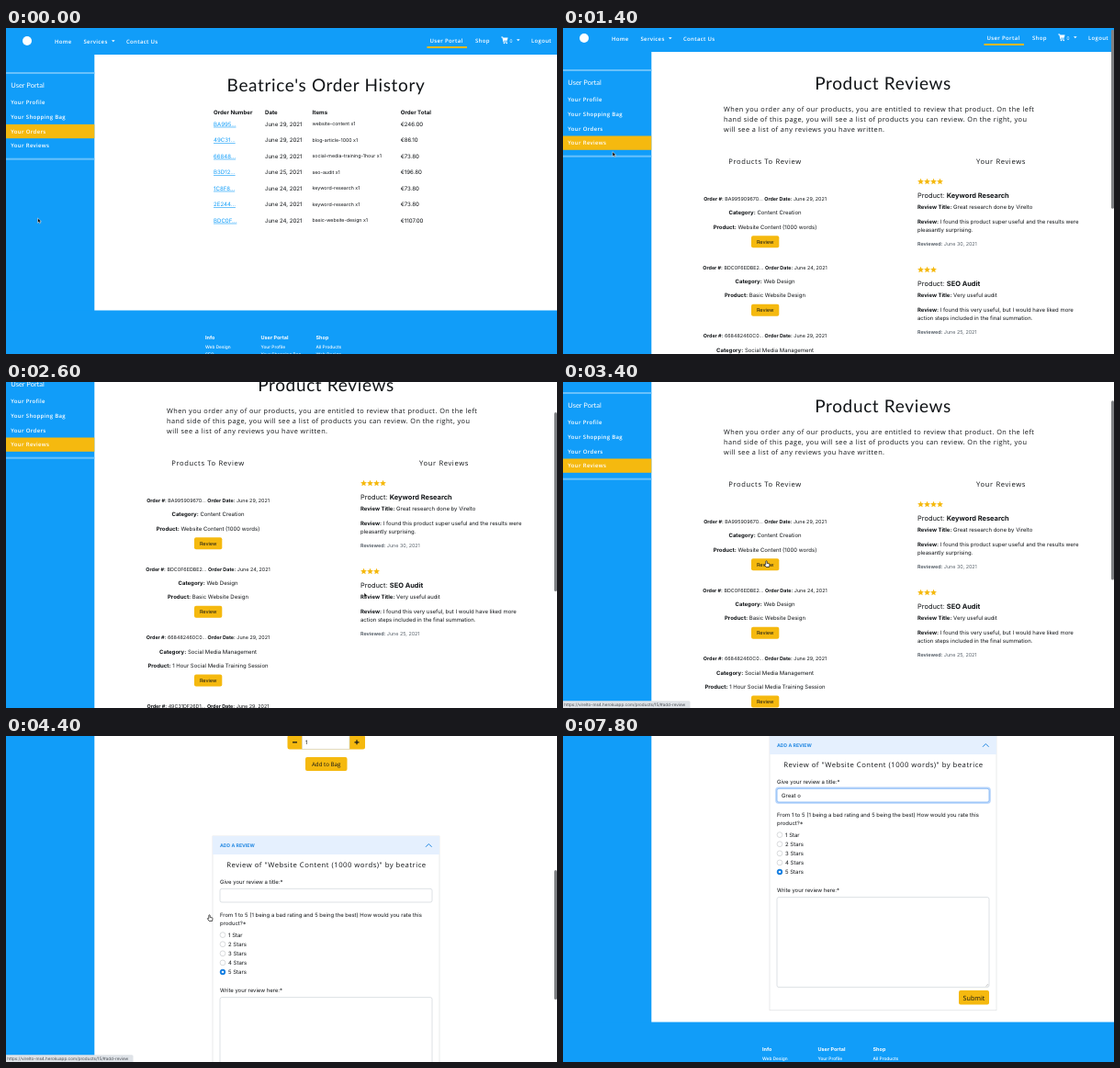
Recreate the animation shown at these times as an HTML page. Size 600 px wide and 355 px high, loop 8 s.

```html
<!DOCTYPE html>
<html lang="en">
<head>
<meta charset="utf-8">
<title>Order history and reviews</title>
<style>
  html, body { margin: 0; width: 100%; height: 100%; overflow: hidden; background: #fff; }
  svg { display: block; width: 600px; height: 355px; }
  text { font-family: Inter, sans-serif; fill: #111417; white-space: pre; text-rendering: geometricPrecision; }
  text.open { font-family: "Open Sans", sans-serif; font-weight: 500; }
  text.title { font-family: Lato, sans-serif; letter-spacing: .65px; text-anchor: middle; }
  text.prose { letter-spacing: .45px; }
  text.menu { font-weight: 600; letter-spacing: .32px; }
  text.side { font-family: Lato, sans-serif; }
  text.mid { text-anchor: middle; }
  text.bold { font-weight: 700; }
  text.white { fill: #fff; }
  text.link { fill: #119df9; }
  text.muted { fill: #59626b; }
</style>
</head>
<body>
<svg viewBox="0 0 600 355" id="stage"></svg>
<script>
const BLUE = '#119df9', YELLOW = '#f5b90f', PALE = '#68c1fb';
const LOOP = 8000, VIEW = 355, SIDE = 96.3;
const SITE = 'https://virelto-ms4.herokuapp.com/';

// ---------- drawing helpers ----------
// y is the middle of the capitals
const text = (x, y, str, size, cls = '', extra = '') =>
  `<text x="${x}" y="${(y + size * .36).toFixed(2)}" font-size="${size}" class="${cls}" ${extra}>` +
  str.replace(/<b>(.*?)<\/b>/g, '<tspan font-weight="700">$1</tspan>') + '</text>';
const rect = (x, y, w, h, fill, r = 0, extra = '') =>
  `<rect x="${x}" y="${y}" width="${w}" height="${h}" rx="${r}" fill="${fill}" ${extra}/>`;
const circle = (x, y, r, fill, extra = '') =>
  `<circle cx="${x}" cy="${y}" r="${r}" fill="${fill}" ${extra}/>`;
const line = (d, stroke, width = 1, extra = '') =>
  `<path d="${d}" fill="none" stroke="${stroke}" stroke-width="${width}" ${extra}/>`;
const shift = (dy, body) => `<g transform="translate(0 ${dy})">${body}</g>`;
const each = (list, fn) => list.map(fn).join('');
const open = (x, y, str, size, cls = '', extra = '') => text(x, y, str, size, 'open ' + cls, extra);
const title = (y, str) => text(348.5, y, str, 19, 'title');
const prose = (x, y, lines) => each(lines, (s, i) => open(x, y + i * 11, s, 7.33, 'prose'));

function star(cx, cy) {
  const points = Array.from({ length: 10 }, (_, i) => {
    const r = i % 2 ? 1.7 : 3.6, a = i * Math.PI / 5;
    return `${(cx + r * Math.sin(a)).toFixed(2)},${(cy - r * Math.cos(a)).toFixed(2)}`;
  });
  return `<polygon points="${points.join(' ')}" fill="${YELLOW}"/>`;
}

// ---------- shared page parts ----------
const caret = (x) => `<path d="M${x} 13.2h3.6l-1.8 2z" fill="#fff"/>`;

function nav(active) {
  const item = (x, s) => open(x, 14.5, s, 6, 'menu white');
  const underline = active === 'Shop' ? rect(508, 20, 22, 2, YELLOW) : rect(458.5, 20, 43.5, 2, YELLOW);
  return rect(0, 0, 600, 29, BLUE) + circle(23, 14, 5, '#fff') +
    item(53, 'Home') + item(84.5, 'Services') + caret(115) + item(131, 'Contact Us') +
    `<g transform="translate(0 -1)">${item(461.5, 'User Portal') + item(511, 'Shop') + item(572, 'Logout')}` +
    caret(556) + open(548.5, 14.8, '0', 5.2, 'white') +
    '<path d="M539.3 10.6h1.8l.3 1h5.2l-.9 3.2h-3.7l.2.8h3.5v.9h-4.2l-1.1-5h-1.1z" fill="#fff"/>' +
    circle(542.5, 17.5, .8, '#fff') + circle(545.2, 17.5, .8, '#fff') + '</g>' + underline;
}

function sidebar(heading, items, active) {
  let y = 81.3, rows = '';
  for (const lines of items) {
    if (lines[0] === active) rows += rect(0, y - 7.6, SIDE, 15.3, YELLOW);
    rows += each(lines, (s, i) => open(5.3, y + i * 9.4, s, 6, 'menu white'));
    y += 15.6 + (lines.length - 1) * 9.4;
  }
  return rect(0, 0, SIDE, 1000, BLUE) + rect(0, 48, SIDE, 2, PALE) + rect(0, y - 2, SIDE, 2, PALE) +
    text(5.3, 62, heading, 7.5, 'side white') + rows;
}

function footer(y) {
  const columns = [
    [217, 'Info', 'Web Design', 'SEO', 'Social Media', 'Content Creation'],
    [277.5, 'User Portal', 'Your Profile', 'Your Shopping Bag', 'Your Orders', 'Your Reviews'],
    [337.5, 'Shop', 'All Products', 'Web Design', 'SEO', 'Social Media']
  ];
  return rect(0, y, 600, 400, BLUE) + each(columns, ([x, head, ...links]) =>
    text(x, y + 30, head, 5.5, 'bold white') +
    each(links, (s, i) => text(x, y + 40 + i * 7.6, s, 4.8, 'white', 'font-weight="500"')));
}

const portalItems = ['Your Profile', 'Your Shopping Bag', 'Your Orders', 'Your Reviews'].map(s => [s]);

// ---------- order history ----------
function ordersPage() {
  const rows = [
    ['BA995', 'June 29', 'website-content', '246.00'],
    ['49C31', 'June 29', 'blog-article-1000', '86.10'],
    ['66848', 'June 29', 'social-media-training-1hour', '73.80'],
    ['B3D12', 'June 25', 'seo-audit', '196.80'],
    ['1C8F8', 'June 24', 'keyword-research', '73.80'],
    ['2E244', 'June 24', 'keyword-research', '73.80'],
    ['BDC0F', 'June 24', 'basic-website-design', '1107.00']
  ];
  const cols = [226, 282, 333.5, 429.7];
  return sidebar('User Portal', portalItems, 'Your Orders') + nav('User Portal') + footer(307.5) +
    title(62.5, "Beatrice's Order History") +
    each(['Order Number', 'Date', 'Items', 'Order Total'], (s, i) => text(cols[i], 92, s, 6.1, 'bold')) +
    each(rows, ([id, day, item, price], i) => {
      const y = 104.5 + i * 17.5;
      return text(cols[0], y, id + '...', 6.1, 'link', 'text-decoration="underline"') +
        text(cols[1], y, day + ', 2021', 6.1) + text(cols[2], y - .3, item + ' x1', 5.25) +
        text(cols[3], y, '€' + price, 6.1);
    }) +
    `<g id="hover">${rect(.5, 120.2, 96, 15.8, BLUE, 0, 'stroke="#0b1a28" stroke-width="1.1"')}` +
    rect(1, 133.6, 95, 1.8, YELLOW) + open(5.3, 128.1, 'Your Reviews', 6, 'menu white') + '</g>';
}

// ---------- reviews ----------
function reviewsPage() {
  const cards = [
    ['BA995909670', 29, 'Content Creation', 'Website Content (1000 words)'],
    ['BDC0F6EDBE2', 24, 'Web Design', 'Basic Website Design'],
    ['668482460C0', 29, 'Social Media Management', '1 Hour Social Media Training Session'],
    ['49C31DF26D1', 29, 'Content Creation', 'Blog Article (1000 words)']
  ];
  const reviews = [
    [4, 'Keyword Research', 'Great research done by Virelto',
      'I found this product super useful and the results were', 'pleasantly surprising.', 30],
    [3, 'SEO Audit', 'Very useful audit',
      'I found this very useful, but I would have liked more', 'action steps included in the final summation.', 25]
  ];
  return sidebar('User Portal', portalItems, 'Your Reviews') + nav('User Portal') + footer(541) +
    title(63, 'Product Reviews') +
    prose(175, 91.5, [
      'When you order any of our products, you are entitled to review that product. On the left',
      'hand side of this page, you will see a list of products you can review. On the right, you',
      'will see a list of any reviews you have written.']) +
    open(220, 148.5, 'Products To Review', 7.6, 'mid', 'letter-spacing=".63"') +
    open(477, 148.5, 'Your Reviews', 7.6, 'mid', 'letter-spacing=".63"') +
    each(cards, ([id, day, category, product], i) => shift(189 + i * 74.6,
      text(220, 0, `<b>Order #:</b> ${id}... <b>Order Date:</b> June ${day}, 2021`, 5.4, 'mid') +
      text(220, 15.2, `<b>Category:</b> ${category}`, 6, 'mid') +
      text(220, 30.6, `<b>Product:</b> ${product}`, 6, 'mid') +
      rect(205, 40.2, 30.3, 13, YELLOW, 2) + text(220.2, 46.6, 'Review', 5.5, 'mid'))) +
    each(reviews, ([stars, product, head, first, second, day], i) => shift(170 + i * 96,
      each([...Array(stars).keys()], n => star(389.5 + n * 7, .3)) +
      text(386, 15.5, `Product: <b>${product}</b>`, 7.45) +
      text(386, 28, `<b>Review Title:</b> ${head}`, 5.97) +
      text(386, 43.4, `<b>Review:</b> ${first}`, 5.97) + text(386, 52.6, second, 5.97) +
      text(386, 68.5, `<b>Reviewed:</b> June ${day}, 2021`, 5.4, 'muted')));
}

// ---------- product ----------
function illustration() {
  const browser = rect(319, 76, 106, 73.5, '#ebebeb') + rect(319, 76, 106, 6.5, '#dfdfdf') +
    each([322, 325.3, 328.6], x => circle(x, 79.3, 1, '#f7f7f7')) +
    rect(343, 91.5, 58, 4.5, 'none', 2, 'stroke="#d2d2d2" stroke-width=".7"') +
    rect(330, 109, 24, 22, '#e5e5e5', 0, 'stroke="#d8d8d8" stroke-width=".6"') +
    each([109.5, 117.7, 126], y => rect(359, y, 58, 5, '#fff', 1));
  const card = rect(294.3, 115, 52.5, 65, '#fff', 4, 'stroke="#777" stroke-width=".9"') +
    rect(304, 125, 33, 21, BLUE, 2) +
    each([151, 159, 167], y => rect(304, y, 33, 4.6, '#c6c6c6', 2.3)) +
    circle(345, 116, 4.8, BLUE) + line('M343 116h4M345 114v4', '#17344c', .8);
  const person =
    '<path d="M274 148h13l-.5 29h-3.6l-2-20-2.8 20.5h-3.6z" fill="#23232b"/>' +
    '<path d="M274 180v-2l3.3-.5 2.2 2.5zM282.5 180v-2.5h3.5l3.5 2.5z" fill="#23232b"/>' +
    line('M284 138l8 .2 4-1.2', '#eea886', 2.2) + line('M289 128l6.5-9.5', '#eea886', 2) +
    '<path d="M275 125q5-2 8 0l6 3 1.6 3-4 1.5 1 16h-13.4l-.8-15q-.5-6 1.6-8.5z" fill="#119df9"/>' +
    line('M277 131l2 6.5 6 1', '#0d7fd0', 2.6) +
    rect(277, 120, 4, 5.5, '#eea886') + circle(278.5, 118, 3.9, '#eea886') +
    '<path d="M273.5 119q-2-5.5 4-6 5-.4 6 2.5-3 .9-5.5.8-.5 3-2 4.2z" fill="#23232b"/>';
  return browser + card + person;
}

function reviewForm() {
  const label = (y, s) => text(233, y, s, 5.95);
  return rect(225, 0, 247, 298.7, '#fff', 0, 'stroke="#dfe1e3" stroke-width=".7"') +
    rect(225, 0, 247, 20, '#e5f0fe') + text(233, 10.2, 'ADD A REVIEW', 5.15, 'bold', 'style="fill:#2187e2"') +
    line('M457 11.8l3.3-3.3 3.3 3.3', '#2187e2', 1) +
    open(349, 31, 'Review of "Website Content (1000 words)" by beatrice', 7.7, 'mid', 'letter-spacing=".5"') +
    label(49.5, 'Give your review a title:*') +
    rect(233, 57.3, 231, 14.7, '#fff', 2, 'stroke="#ced4da" stroke-width=".7"') +
    `<g id="focus">${rect(232.2, 56.5, 232.6, 16.3, 'none', 2.5, 'stroke="#b9d6fb" stroke-width="2"')}` +
    rect(233, 57.3, 231, 14.7, '#fff', 2, 'stroke="#7db3f5" stroke-width=".8"') + '</g>' +
    text(238, 64.6, '', 6, '', 'id="typed"') + rect(238, 61, .7, 7.2, '#222', 0, 'id="caret"') +
    label(86, 'From 1 to 5 (1 being a bad rating and 5 being the best) How would you rate this') +
    label(95.3, 'product?*') +
    each([1, 2, 3, 4, 5], n => {
      const y = 97.5 + n * 10.1, on = n === 5;
      return circle(236, y, 2.9, on ? '#0d7ae0' : '#fff', `stroke="${on ? '#0d7ae0' : '#bfc3c7'}" stroke-width=".6"`) +
        (on ? circle(236, y, 1.3, '#fff') : '') + text(242, y, `${n} Star${n > 1 ? 's' : ''}`, 6);
    }) +
    label(167.5, 'Write your review here:*') +
    rect(233, 175.6, 231, 98, '#fff', 2, 'stroke="#ced4da" stroke-width=".7"') +
    line('M460.5 272.6l2.6-2.6M462 272.6l1.1-1.1', '#999', .5) +
    rect(431, 277, 33, 15.4, YELLOW, 2) + open(447.5, 285, 'Submit', 7.2, 'mid');
}

const FORM_TOP = 477;

function productPage() {
  const menu = [['Shop All Products'], ['Shop Web Design'], ['Shop SEO'],
    ['Shop Social Media', 'Management'], ['Shop Content Creation']];
  return sidebar('Shop', menu) + nav('Shop') + footer(788.5) +
    line('M115 47h-5.3m2.5-2.6l-2.6 2.6 2.6 2.6', '#1187e0', 1) +
    text(117, 47, 'Back to Reviews', 6.5, '', 'style="fill:#1187e0"') +
    title(87.5, 'Website Content (1000 words)') + shift(39, illustration()) +
    prose(172, 237.5, [
      "If you don't need a full website redesign, but you feel like some of your main content is",
      'outdated, then this is the perfect content refurbishment option for your business. We will',
      're-write and rework any of your website pages from a content perspective up to 1000',
      'words.']) +
    open(172, 293, 'Features include:', 6.6, 'prose bold') +
    circle(178, 308.3, 1.3, '#111417') + prose(184, 308, ['1000 Words Of Website Content']) +
    open(348, 327.3, '€200.00 + €46.00 VAT @23%', 6, 'mid', 'letter-spacing=".43"') +
    open(349, 339.6, 'TOTAL: €246.00', 7.3, 'mid link', 'letter-spacing=".48"') +
    open(306.5, 356, 'Quantity:', 5.6, 'bold', 'letter-spacing=".15"') +
    rect(306.5, 367, 84.5, 15.5, YELLOW, 2.5) + rect(322.5, 367.3, 51.5, 14.9, '#fff', 0, 'stroke="#ced4da" stroke-width=".6"') +
    line('M312 374.8h5M379.5 374.8h5M382 372.3v5', '#111417', 1.2) + text(326, 375, '1', 6) +
    rect(326, 391, 45.5, 15, YELLOW, 2) + open(348.7, 398.6, 'Add to Bag', 6.2, 'mid') +
    shift(FORM_TOP, reviewForm());
}

const statusBar = (id, path, width) =>
  `<g id="${id}">${rect(-2, 347.3, width + 2, 10, '#dfe3e8', 1.5)}${text(1.3, 351.4, SITE + path, 4.6, '', 'style="fill:#4a4f55"')}</g>`;

const stage = document.getElementById('stage');
stage.innerHTML = rect(0, 0, 600, VIEW, '#fff') +
  `<g id="orders">${ordersPage()}</g><g id="reviews">${reviewsPage()}</g><g id="product">${productPage()}</g>` +
  rect(597, 0, 3, 10, '#808285', 1.5, 'id="thumb"') +
  statusBar('reviewsUrl', 'user-portal/reviews', 125) +
  statusBar('productUrl', 'products/15/#add-review', 138.5) +
  '<path id="arrow" d="M0 0V5.2L1.3 4 2.1 5.9 3.1 5.4 2.3 3.7H3.9Z" fill="#000" stroke="#fff" stroke-width=".5"/>' +
  '<path id="hand" d="M-.7 3V0a.7.7 0 0 1 1.4 0V1.9L3 2.4Q3.7 2.6 3.5 3.5L3 6H-.3L-2.2 3.3Q-1.6 2.4-.7 3.2Z" fill="#fff" stroke="#111" stroke-width=".7"/>';

// ---------- timeline ----------
const $ = Object.fromEntries([...stage.querySelectorAll('[id]')].map(el => [el.id, el]));
const show = (el, on) => { el.style.display = on ? '' : 'none'; };
const within = (t, a, b) => t >= a && t < b;
const clamp = v => Math.max(0, Math.min(1, v));
const smooth = p => p * p * (3 - 2 * p);

function track(keys, t) {
  const i = keys.findIndex(k => k[0] > t);
  if (i < 0) return keys[keys.length - 1].slice(1);
  if (i === 0) return keys[0].slice(1);
  const a = keys[i - 1], b = keys[i], p = smooth((t - a[0]) / (b[0] - a[0]));
  return a.slice(1).map((v, n) => v + (b[n + 1] - v) * p);
}

const POINTER = [[100, 34.5, 207], [900, 26.5, 127], [1300, 26.5, 127], [1900, 390, 229.5],
  [2800, 390, 229.5], [3400, 221.5, 195.5]];
const REVIEW_SCROLL = [[1300, 0], [1950, 49], [2050, 49], [2550, 60], [2900, 60], [3400, 37]];
const PRODUCT_SCROLL = [[3863, 0], [4643, FORM_TOP]];
const TYPED = 'Great o', TYPE_START = 6300, TYPE_STEP = 220;

function draw(t) {
  const page = t < 1200 ? 'orders' : t < 3800 ? 'reviews' : 'product';
  for (const name of ['orders', 'reviews', 'product']) show($[name], name === page);

  const [scroll] = page === 'orders' ? [0] : track(page === 'reviews' ? REVIEW_SCROLL : PRODUCT_SCROLL, t);
  const height = page === 'reviews' ? 646 : 894;
  $[page].setAttribute('transform', `translate(0 ${-Math.round(scroll)})`);
  $.thumb.setAttribute('y', scroll * VIEW / height);
  $.thumb.setAttribute('height', VIEW * VIEW / height);
  $.thumb.style.opacity = clamp((5350 - t) / 250);
  show($.thumb, within(t, 1350, 3800) || t >= 3870);

  show($.hover, t >= 800);
  show($.reviewsUrl, within(t, 800, 1300));
  show($.productUrl, within(t, 3350, 4600));

  const [x, y] = track(POINTER, t);
  const hand = within(t, 550, 1350) || t >= 3300;
  const pointer = t < TYPE_START;
  show($.arrow, pointer && !hand);
  show($.hand, pointer && hand);
  (hand ? $.hand : $.arrow).setAttribute('transform', `translate(${x} ${y})`);

  $.focus.style.opacity = clamp((t - 5000) / 150);
  const count = Math.max(0, Math.floor((t - TYPE_START) / TYPE_STEP) + 1);
  const typed = TYPED.slice(0, count);
  if ($.typed.textContent !== typed) $.typed.textContent = typed;
  const blink = t >= 5200 && (t - 5200) % 1000 < 500;
  show($.caret, blink);
  if (blink) $.caret.setAttribute('x', 238 + (typed ? $.typed.getComputedTextLength() + .3 : 0));
}

const start = performance.now();
function tick() {
  draw((performance.now() - start) % LOOP);
  requestAnimationFrame(tick);
}
tick();
</script>
</body>
</html>
```
